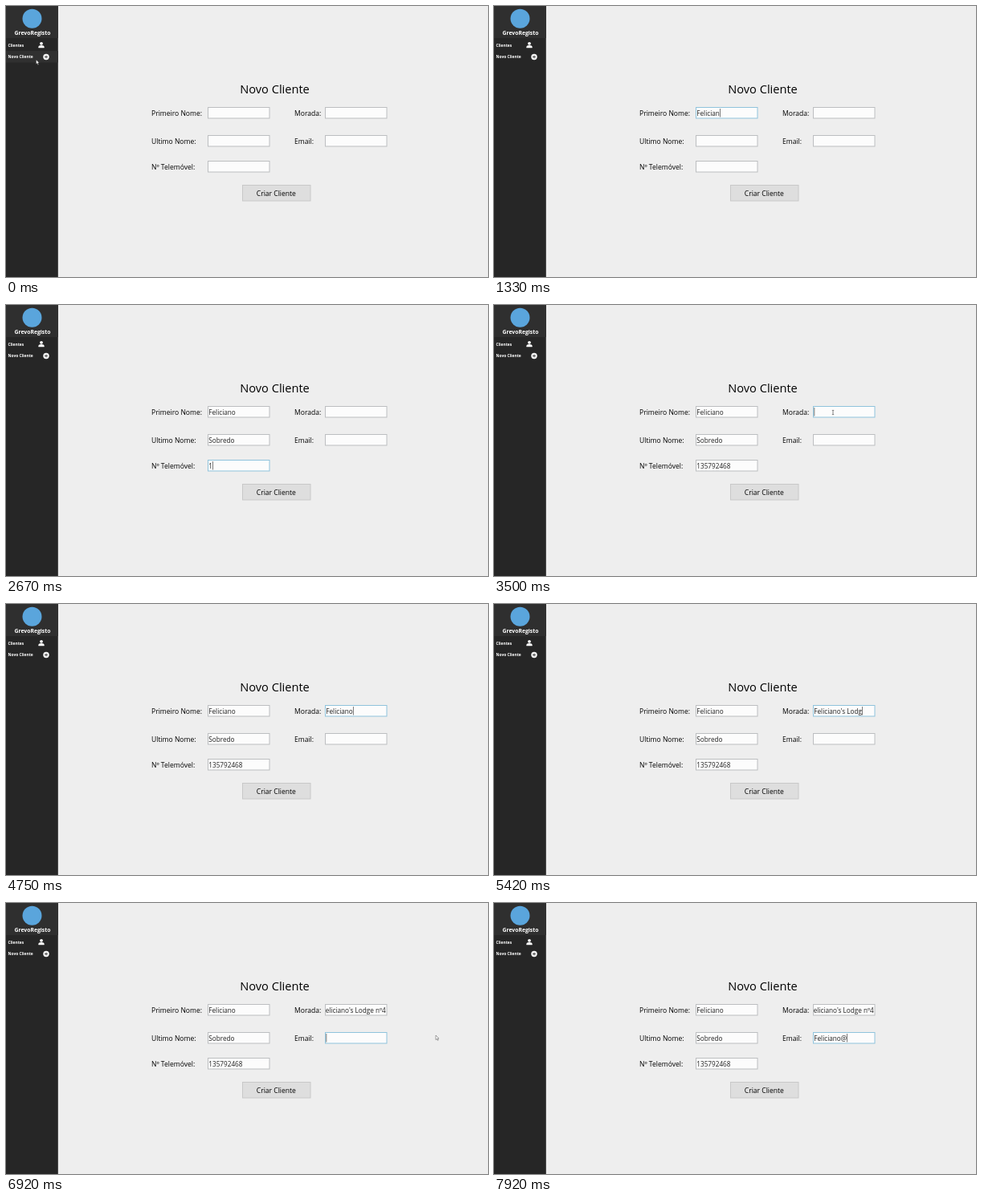
Animation, 600 px wide and 338 px high, one loop 8000 ms. Source, as an HTML page:

```html
<!DOCTYPE html>
<html lang="pt">
<head>
<meta charset="utf-8">
<title>Novo Cliente</title>
<style>
  html, body { margin: 0; width: 100%; height: 100%; overflow: hidden; background: #eee; }
  svg { display: block; width: 100%; height: 100%; }
  text { font-family: "Open Sans", "Noto Sans", sans-serif; font-size: 8.55px; fill: #000; white-space: pre; }
  .title { font-size: 14.6px; }
  .side { font-size: 4.9px; font-weight: 700; fill: #fff; }
  .brand { font-size: 6.8px; }
  .value { font-size: 8.2px; fill: #222; }
</style>
</head>
<body>
<svg viewBox="0 0 600 338">
  <rect width="600" height="338" fill="#eee"/>
  <rect width="64.8" height="338" fill="#262626"/>
  <rect width="64.8" height="40" fill="#2f2f2f"/>
  <rect id="hover" y="56" width="64.8" height="14.5" fill="#303030"/>
  <circle cx="32.5" cy="15.8" r="12" fill="#5aa5dc"/>
  <text class="side brand" x="33" y="36.3" text-anchor="middle">GrevoRegisto</text>
  <text class="side" x="2.5" y="50.6">Clientes</text>
  <text class="side" x="2.5" y="65.3">Novo Cliente</text>
  <g fill="#fff">
    <circle cx="44" cy="46.8" r="1.9"/>
    <path d="M40.4 52.2v-1q0-2.1 3.6-2.1t3.6 2.1v1z"/>
    <circle cx="50" cy="63.5" r="3.7"/>
  </g>
  <path d="M50 61.5v4M48 63.5h4" stroke="#262626" stroke-width=".8"/>
  <text class="title" x="334.5" y="108.8" text-anchor="middle">Novo Cliente</text>
  <g id="form"></g>
  <rect x="294.5" y="223.5" width="84.5" height="19.5" fill="#dedede" stroke="#c8c8c8"/>
  <text x="336.3" y="236.8" text-anchor="middle">Criar Cliente</text>
  <path id="arrow" d="M0 0v5.6l1.3-1.2 1 2 .9-.4-1-2h1.7z" fill="#fff" stroke="#222" stroke-width=".4"/>
  <path id="beam" d="M-1.2-2.6h2.4M0-2.6v5.2M-1.2 2.6h2.4" fill="none" stroke="#555" stroke-width=".7"/>
</svg>
<script>
const LOOP = 8000, STEP = 1000 / 12, BLINK = 530, W = 77, H = 14;
const COLUMNS = [{ label: 181, box: 251 }, { label: 359, box: 397 }];
const ROWS = [126, 161, 193];
const NS = "http://www.w3.org/2000/svg";
const $ = id => document.getElementById(id);

function add(parent, tag, attrs, text) {
  const el = document.createElementNS(NS, tag);
  for (const k in attrs) el.setAttribute(k, attrs[k]);
  if (text) el.textContent = text;
  return parent.appendChild(el);
}

// from: gets the focus; start: first key; beat: time per key
const fields = [
  { label: "Primeiro Nome:", text: "Feliciano", from: 900, start: 1000, beat: 41 },
  { label: "Ultimo Nome:", text: "Sobredo", from: 1570, start: 1740, beat: 83 },
  { label: "Nº Telemóvel:", text: "135792468", from: 2410, start: 2590, beat: 54 },
  { label: "Morada:", text: "Feliciano's Lodge nº4", from: 3410, start: 4008, beat: 82 },
  { label: "Email:", text: "Feliciano@", from: 6410, start: 6950, beat: 82 }
];

// The pointer eases between two places and hides when typing begins
const moves = [
  { show: 0, go: 400, stop: 900, hide: 1000, a: [37.5, 67], b: [266, 133] },
  { show: 3080, go: 3080, stop: 3410, hide: 4000, a: [340, 231], b: [422, 134] },
  { show: 6080, go: 6080, stop: 6670, hide: 6950, a: [422, 134], b: [535, 165] }
];

// Symbols take two beats to type
const cost = ch => "'@".includes(ch) ? 2 : 1;

fields.forEach((f, i) => {
  const form = $("form"), column = COLUMNS[Math.floor(i / 3)];
  f.x = column.box;
  f.y = ROWS[i % 3];
  f.until = i + 1 < fields.length ? fields[i + 1].from : LOOP;
  let time = f.start;
  f.times = [...f.text].map(ch => time += cost(ch) * f.beat);
  f.end = time;

  const base = f.y + 11;
  add(form, "text", { x: column.label, y: base }, f.label);
  f.box = add(form, "rect", { x: f.x + .5, y: f.y + .5, width: W - .5, height: H - .5, fill: "#fcfcfc" });
  const clip = add(form, "clipPath", { id: "clip" + i });
  add(clip, "rect", { x: f.x + 1, y: f.y + 1, width: W - 1.5, height: H - 2 });
  const inner = add(form, "g", { "clip-path": `url(#clip${i})` });
  f.value = add(inner, "text", { class: "value", y: base });
  f.caret = add(inner, "rect", { y: f.y + 2, width: .7, height: 10.5, fill: "#444" });
});

const show = (el, on) => el.setAttribute("visibility", on ? "visible" : "hidden");

function drawField(f, t) {
  const focused = t >= f.from && t < f.until;
  const n = f.times.filter(time => time <= t).length;
  f.value.textContent = f.text.slice(0, n);
  const width = n ? f.value.getComputedTextLength() : 0;
  const left = f.x + 1.3 + Math.min(0, W - 2.6 - width);
  f.value.setAttribute("x", left);
  f.caret.setAttribute("x", left + width + .2);
  f.box.setAttribute("stroke", focused ? "#8fc3dc" : "#bcbec0");

  const typing = t > f.start && t < f.end;
  const idle = t - (t < f.end ? f.from : f.end);
  show(f.caret, focused && (typing || idle % (2 * BLINK) < BLINK));
}

function pointerAt(m, t) {
  const u = Math.min(1, Math.max(0, (t - m.go) / (m.stop - m.go)));
  const ease = u * u * (3 - 2 * u);
  return m.a.map((v, k) => v + (m.b[k] - v) * ease);
}

function drawPointer(t) {
  const move = moves.find(m => t >= m.show && t < m.hide);
  const [x, y] = move ? pointerAt(move, t) : [0, 0];
  const over = fields.some(f => x > f.x && x < f.x + W && y > f.y && y < f.y + H);
  for (const id of ["arrow", "beam"]) {
    $(id).setAttribute("transform", `translate(${x} ${y})`);
    show($(id), move && over === (id === "beam"));
  }
  show($("hover"), move && x < 65);
}

function draw(ms) {
  const t = Math.floor((ms % LOOP + 4) / STEP) * STEP % LOOP;
  fields.forEach(f => drawField(f, t));
  drawPointer(t);
}

const start = performance.now();
(function tick() {
  draw(performance.now() - start);
  requestAnimationFrame(tick);
})();
</script>
</body>
</html>
```
